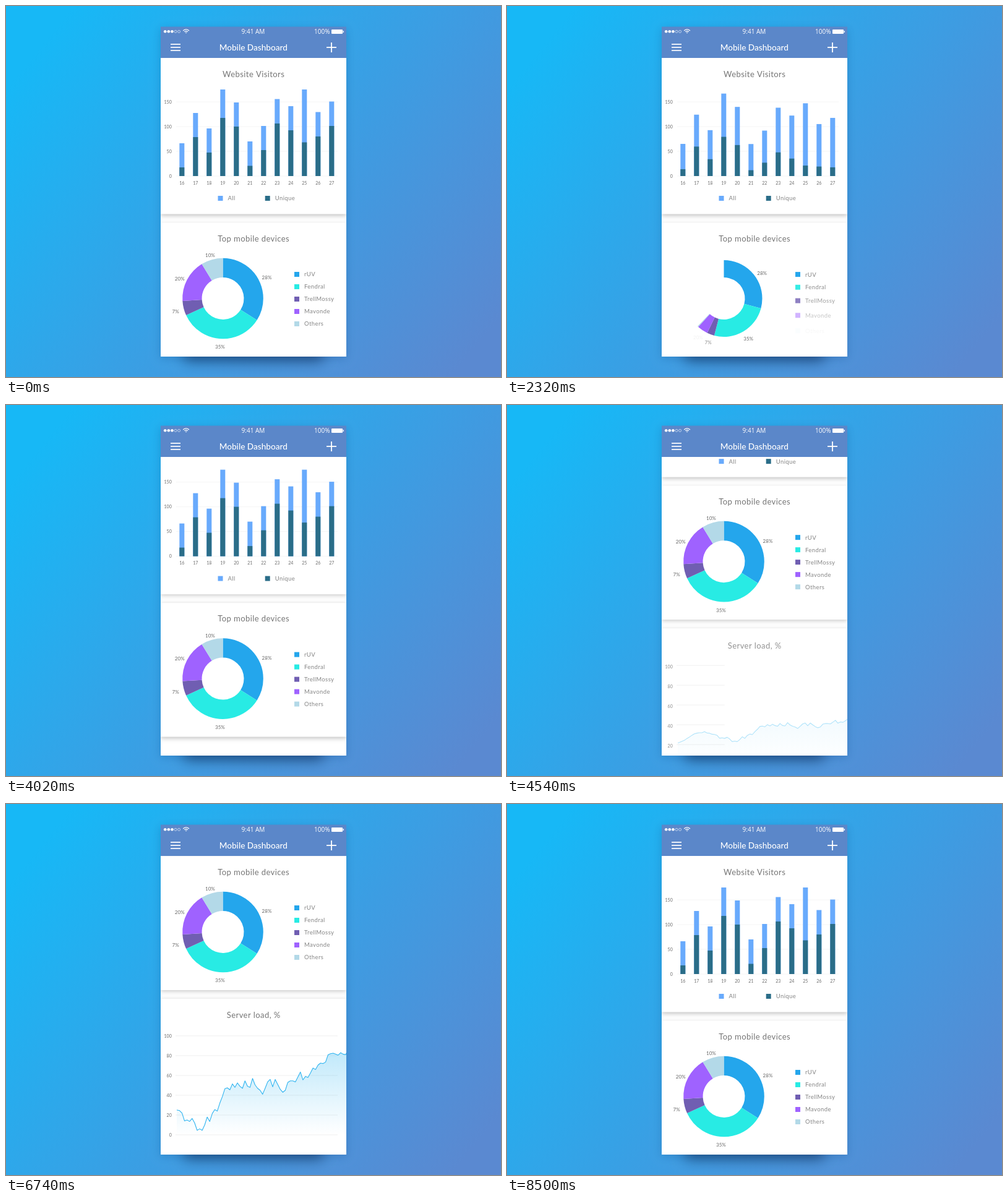
Recreate the animation shown at these times as an HTML page with a canvas. Size 800x600 px, loop 8940 ms.

```html
<!DOCTYPE html>
<html lang="en">
<head>
<meta charset="utf-8">
<title>Mobile Dashboard</title>
<style>
html, body { margin: 0; width: 100%; height: 100%; overflow: hidden; background: #3a9de3; }
canvas { display: block; width: 800px; height: 600px; }
</style>
</head>
<body>
<canvas id="stage" width="800" height="600"></canvas>
<script>
const ctx = document.getElementById('stage').getContext('2d');
const LOOP = 8940;
const LATO = 'Lato, "Open Sans", sans-serif';
const OPEN = '"Open Sans", "Noto Sans", sans-serif';
const GREY = '#757575', LEGEND = '#858585', AXIS = '#6c6c6c';

const all = [53, 102, 77, 140, 119, 56, 81, 124.5, 113, 140, 103.5, 120.5];
const unique = [14, 63, 38, 94, 80, 16.5, 42, 85, 74, 54.5, 64, 81];

// label, share text, arc in degrees, colour
const slices = [
  ['rUV', '28%', 122.5, '#24a6ec'],
  ['Fendral', '35%', 123, '#28ebe4'],
  ['TrellMossy', '7%', 21, '#705eb2'],
  ['Mavonde', '20%', 62, '#9f62ff'],
  ['Others', '10%', 31.5, '#b3d9e8']
];

const load = [
  0, 2, 5, 8, 13, 17, 22, 26, 28, 29, 29, 32, 28.5, 28, 25, 24.5, 22, 14, 15, 13.5,
  16.5, 12, 4.5, 6, 4.5, 10, 18, 13.5, 21.5, 25.5, 24, 32, 38.5, 46.5, 47.5, 45.5,
  51.5, 48, 52.5, 49, 47, 54.5, 49, 48, 57, 50.5, 47, 45, 41, 47, 53.5, 56, 48.5,
  56, 51, 46, 43, 45, 53, 54.5, 54.5, 53.5, 58.5, 63.5, 55.5, 59, 58, 62.5, 67.5,
  66, 70.5, 72.5, 72, 73.5, 81, 82, 82.5, 81.5, 80.5, 83, 81.5, 81, 87, 90.5, 89,
  90.5, 86, 81.5, 80, 83
];

const clamp = v => Math.max(0, Math.min(1, v));

// cubic-bezier(.25, .1, .25, 1)
function ease(x) {
  if (x <= 0) return 0;
  if (x >= 1) return 1;
  let lo = 0, hi = 1, s = 0.5;
  for (let i = 0; i < 22; i++) {
    s = (lo + hi) / 2;
    if (0.75 * s * (1 - s) + s * s * s < x) lo = s; else hi = s;
  }
  return 0.3 * s * (1 - s) * (1 - s) + 3 * s * s * (1 - s) + s * s * s;
}
const tween = (t, start, length) => ease((t - start) / length);

function rect(x, y, w, h, color) {
  ctx.fillStyle = color;
  ctx.fillRect(x, y, w, h);
}

function text(str, x, y, size, color, { align = 'left', gap = 0, weight = 400, font = LATO } = {}) {
  ctx.font = `${weight} ${size}px ${font}`;
  ctx.letterSpacing = gap + 'px';
  ctx.textAlign = align;
  ctx.fillStyle = color;
  ctx.fillText(str, x, y + size * 0.36);
}

// draws content fading in while it rises to its place
function appear(p, draw) {
  if (p <= 0) return;
  ctx.save();
  ctx.globalAlpha *= p;
  ctx.translate(0, 12 * (1 - p));
  draw();
  ctx.restore();
}

const title = (p, str, y) =>
  appear(p, () => text(str, 400.2, y, 13, GREY, { align: 'center', gap: 0.42 }));

function legend(str, x, y, color) {
  rect(x, y - 4, 8, 8, color);
  text(str, x + 16, y, 9.5, LEGEND, { gap: 0.4 });
}

function card(p, y, h) {
  if (p <= 0) return;
  ctx.save();
  ctx.globalAlpha = p;
  ctx.shadowColor = 'rgba(0,0,0,.24)';
  ctx.shadowBlur = 7;
  ctx.shadowOffsetY = 2;
  rect(250, y + 26 * (1 - p), 300, h, '#fff');
  ctx.restore();
}

function visitors(t) {
  title(tween(t, 540, 900), 'Website Visitors', 110);
  const grid = tween(t, 600, 900);
  for (let i = 0; i < 4; i++) {
    const y = 275 - 40 * i;
    rect(275, y - 0.5, 261 * grid, 1, '#f5f5f5');
    appear(tween(t, 580 + 40 * i, 720), () => text(50 * i, 267.7, y, 7, AXIS, { align: 'right' }));
  }
  for (let i = 0; i < 12; i++) {
    const x = 280.3 + 22 * i;
    const a = all[i] * tween(t, 1005 + 50 * i, 1600);
    const u = unique[i] * tween(t, 1540 + 50 * i, 1600);
    rect(x, 275 - a, 8, a, '#68aafc');
    rect(x, 275 - u, 8, u, '#2a6d88');
    appear(tween(t, 640 + 30 * i, 700), () => text(16 + i, x + 4, 286, 7, AXIS, { align: 'center' }));
  }
  appear(tween(t, 700, 700), () => legend('All', 342.5, 311, '#68aafc'));
  appear(tween(t, 800, 700), () => legend('Unique', 418.7, 311, '#2a6d88'));
}

function devices(t) {
  title(tween(t, 640, 900), 'Top mobile devices', 376);
  const cx = 350.5, cy = 473, inner = 34;
  const outer = inner + 31.3 * tween(t, 1400, 1500);
  let from = 0;
  slices.forEach(([name, share, arc, color], i) => {
    const start = 1425 + 200 * i;
    const sweep = arc * tween(t, start, 1600) * Math.PI / 180;
    if (sweep > 0) {
      const a = from - Math.PI / 2;
      ctx.beginPath();
      ctx.arc(cx, cy, outer, a, a + sweep);
      ctx.arc(cx, cy, inner, a + sweep, a, true);
      ctx.closePath();
      ctx.fillStyle = color;
      ctx.fill();
      const mid = from + sweep / 2;
      ctx.save();
      ctx.globalAlpha *= clamp((t - start - 270) / 300);
      text(share, cx + 1 + (outer + 14.5) * Math.sin(mid),
        cy + 3 - (outer + 10.5) * Math.cos(mid), 8, '#666', { align: 'center' });
      ctx.restore();
    }
    from += sweep;
    appear(tween(t, start + 15, 1000), () => legend(name, 466, 434 + 20 * i, color));
  });
}

function server(t) {
  const zero = 801, unit = 1.6;
  title(tween(t, 4050, 1000), 'Server load, %', 607);
  const grid = tween(t, 4220, 1600);
  for (let i = 0; i < 6; i++) {
    const y = zero - 32 * i;
    rect(274, y - 0.5, 262 * grid, 1, '#f0f0f0');
    appear(tween(t, 4050, 1000), () => text(20 * i, 267.7, y, 7, AXIS, { align: 'right' }));
  }
  const k = tween(t, 4172, 1600);
  if (k <= 0) return;
  const shift = (t - 5660) * 0.025;
  const base = 33.6;
  ctx.save();
  ctx.globalAlpha *= k;
  ctx.beginPath();
  ctx.rect(276, 600, 274, 220);
  ctx.clip();
  const trace = () => load.forEach((v, i) =>
    ctx.lineTo(246.4 + 4.07 * i - shift, zero - unit * (base + k * (v - base))));
  const fill = ctx.createLinearGradient(0, zero - 150, 0, zero);
  fill.addColorStop(0, 'rgba(42,180,240,.33)');
  fill.addColorStop(1, 'rgba(42,180,240,0)');
  ctx.beginPath();
  ctx.moveTo(246.4 - shift, zero);
  trace();
  ctx.lineTo(246.4 + 4.07 * (load.length - 1) - shift, zero);
  ctx.fillStyle = fill;
  ctx.fill();
  ctx.beginPath();
  trace();
  ctx.strokeStyle = '#2fb4f0';
  ctx.lineWidth = 1.1;
  ctx.lineJoin = 'round';
  ctx.stroke();
  ctx.restore();
}

function backdrop() {
  const g = ctx.createLinearGradient(60, 60, 720, 600);
  g.addColorStop(0, '#17b8f6');
  g.addColorStop(0.6, '#3f9be1');
  g.addColorStop(1, '#5a89d1');
  rect(0, 0, 800, 600, g);
  ctx.save();
  ctx.shadowColor = 'rgba(10,40,85,.65)';
  ctx.shadowBlur = 22;
  ctx.shadowOffsetY = 8;
  rect(288, 530, 224, 36, '#fff');
  ctx.shadowColor = 'rgba(10,50,110,.22)';
  ctx.shadowBlur = 14;
  ctx.shadowOffsetY = 3;
  rect(250, 34, 300, 533, '#fff');
  ctx.restore();
}

function header() {
  rect(250, 33.5, 300, 50.5, '#5b87c9');
  ctx.strokeStyle = ctx.fillStyle = '#fff';
  for (let i = 0; i < 5; i++) {
    ctx.beginPath();
    ctx.arc(257.2 + 5.6 * i, 41.3, i < 3 ? 2.3 : 2, 0, 7);
    ctx.lineWidth = 0.6;
    if (i < 3) ctx.fill(); else ctx.stroke();
  }
  ctx.lineWidth = 1.3;
  for (const r of [1, 3.6, 6.4]) {
    ctx.beginPath();
    ctx.arc(291, 44.3, r, -Math.PI * 0.77, -Math.PI * 0.23);
    ctx.stroke();
  }
  text('9:41 AM', 399.5, 41.3, 10, '#fff', { align: 'center', weight: 500, font: OPEN });
  text('100%', 498, 41.3, 10, '#fff', { weight: 500, font: OPEN });
  ctx.beginPath();
  ctx.roundRect(526, 38, 18, 7, 1);
  ctx.fill();
  rect(544.6, 40, 1.3, 3, '#fff');
  for (const y of [61, 66, 71]) rect(266, y, 16, 1.7, '#fff');
  text('Mobile Dashboard', 399.8, 67, 13.6, '#fff', { align: 'center', weight: 500 });
  rect(518, 66, 16, 1.8, '#fff');
  rect(525.1, 59, 1.8, 16, '#fff');
}

function draw(time) {
  const t = time < 20 ? 8700 : time;
  ctx.clearRect(0, 0, 800, 600);
  backdrop();
  ctx.save();
  ctx.beginPath();
  ctx.rect(250, 84, 300, 483);
  ctx.clip();
  const scroll = 266 * (tween(t, 3880, 1258) - tween(t, 7255, 1245));
  ctx.translate(0, -scroll);
  const enter = tween(t, 10, 340);
  card(enter, 84, 252.5);
  card(enter, 350.5, 216.5);
  card(tween(t, 4030, 320), 581, 270);
  visitors(t);
  devices(t);
  server(t);
  ctx.restore();
  header();
}

const begin = performance.now();
function frame() {
  draw((performance.now() - begin) % LOOP);
  requestAnimationFrame(frame);
}
frame();
</script>
</body>
</html>
```
